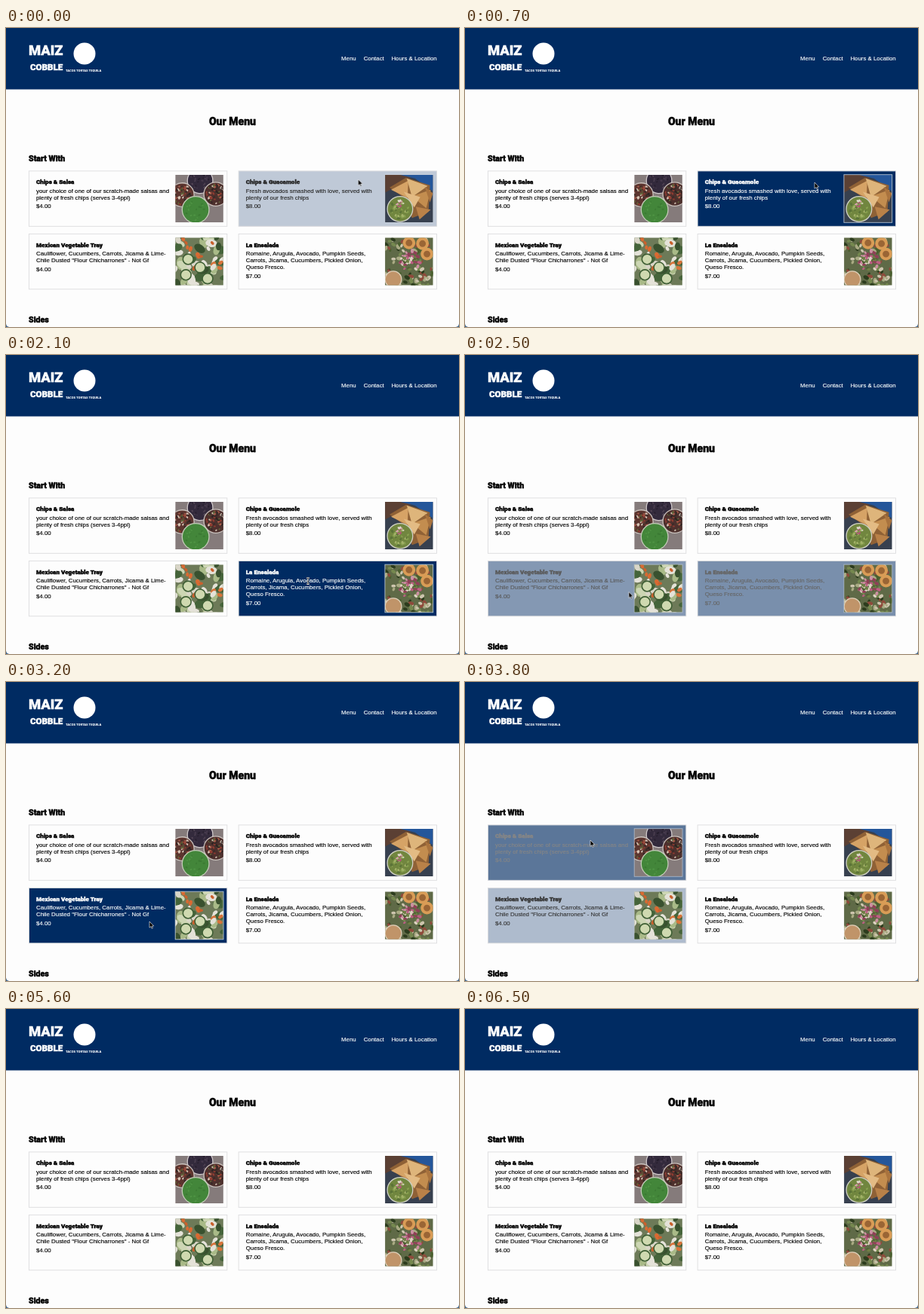
Animation of 600x397 px, one loop 6600 ms. Source, as an HTML page:

```html
<!DOCTYPE html>
<html lang="en">
<head>
<meta charset="utf-8">
<title>Menu</title>
<style>
  @property --h { syntax: "<number>"; inherits: true; initial-value: 0; }
  html, body { margin: 0; height: 100%; overflow: hidden; background: #fdfdfd; }
  #stage { display: block; width: 100vw; height: 100vh; }
  text {
    font: 7.86px "Liberation Sans", Arial, sans-serif;
    white-space: pre;
    fill: var(--ink);
    stroke: var(--ink);
    stroke-width: .14px;
  }
  .bold { font-family: Roboto, Inter, sans-serif; font-weight: 900; stroke-width: .45px; }
  #stage { --ink: #000; }
  #header { --ink: #fff; }

  /* --h runs from 0 (idle) to 1 (hovered) */
  .card {
    --tone: calc(255 * var(--h) * (.5 + .5 * var(--h)));
    --ink: rgb(var(--tone), var(--tone), var(--tone));
    animation: 6.6s ease infinite;
  }
  .panel { fill: rgb(0 43 98 / var(--h)); stroke: #dcdcde; }
  .edge { fill: none; stroke: rgb(255 255 255 / calc(.7 * var(--h))); }
  #salsa { animation-name: salsa; }
  #guacamole { animation-name: guacamole; }
  #tray { animation-name: tray; }
  #salad { animation-name: salad; }
  @keyframes guacamole {
    0% { --h: .24; animation-timing-function: cubic-bezier(.2, .6, .4, 1); }
    6.06%, 17.27% { --h: 1; }
    24.85%, 100% { --h: 0; }
  }
  @keyframes salad {
    0%, 18.94% { --h: 0; }
    26.52%, 35.76% { --h: 1; }
    43.33%, 100% { --h: 0; }
  }
  @keyframes tray {
    0%, 35.76% { --h: 0; }
    43.33%, 54.55% { --h: 1; }
    62.12%, 100% { --h: 0; }
  }
  @keyframes salsa {
    0%, 54.77% { --h: 0; }
    62.35%, 70.38% { --h: 1; }
    77.95%, 100% { --h: 0; }
  }

  #cursor { animation: move 6.6s linear infinite; }
  #arrow { animation: arrow 6.6s step-end infinite; }
  #beam { animation: beam 6.6s step-end infinite; }
  @keyframes move {
    0% { transform: translate(466.5px, 201px); }
    4.55%, 13.64% { transform: translate(463px, 205px); }
    17.27% { transform: translate(448px, 263px); }
    18.94% { transform: translate(435px, 273px); }
    22.73% { transform: translate(407px, 297px); }
    25.76%, 32.58% { transform: translate(400px, 300px); }
    35.76% { transform: translate(300px, 310px); }
    37.88% { transform: translate(217px, 314.5px); }
    40.91%, 50.76% { transform: translate(190px, 318px); }
    54.55% { transform: translate(172px, 268px); }
    57.58%, 67.42% { transform: translate(166px, 210px); }
    70.38% { transform: translate(180px, 189px); }
    72.73% { transform: translate(185.5px, 119px); }
    75.76% { transform: translate(192px, 25px); }
    77.27%, 100% { transform: translate(196px, -22px); }
  }
  @keyframes beam {
    0%, 15.2%, 35.21%, 52.47% { opacity: 0; }
    14.05%, 22.42%, 51.14% { opacity: 1; }
    100% { opacity: 0; }
  }
  @keyframes arrow {
    0%, 15.2%, 35.21%, 52.47% { opacity: 1; }
    14.05%, 22.42%, 51.14% { opacity: 0; }
    100% { opacity: 1; }
  }
</style>
</head>
<body>
<svg id="stage" viewBox="0 0 600 397">
  <rect width="600" height="397" fill="#fdfdfd"/>
  <rect width="600" height="81.5" fill="#002b62"/>

  <g id="header">
    <text class="bold" x="30" y="36" style="font-size:18.4px">MAIZ</text>
    <text class="bold" x="32" y="56" style="font-size:11.6px">COBBLE</text>
    <circle cx="104" cy="34" r="14.5" fill="#fff"/>
    <text class="bold" x="79" y="58" style="font-size:4.1px;stroke-width:0">TACOS TORTAS TEQUILA</text>
    <text x="444" y="43">Menu</text>
    <text x="473.7" y="43">Contact</text>
    <text x="570.7" y="43" text-anchor="end">Hours &amp; Location</text>
  </g>

  <text class="bold" x="300" y="129" text-anchor="middle" style="font-size:14px">Our Menu</text>
  <text class="bold" x="30" y="177" style="font-size:10.6px">Start With</text>
  <text class="bold" x="30" y="391" style="font-size:10.6px">Sides</text>

  <g id="cards"></g>

  <path d="M0 392.5Q.5 396.5 4.5 397H0ZM600 392.5Q599.5 396.5 595.5 397H600Z" fill="#3f658c"/>

  <g id="cursor">
    <path id="arrow" d="M0 0V8.2L1.9 6.5 3.1 9.3 4.4 8.7 3.2 6H5.8Z" fill="#000" stroke="#fff" stroke-width=".6"/>
    <g id="beam" fill="none">
      <g stroke="#fff" stroke-width="1.7"><use href="#bar"/></g>
      <g stroke="#222" stroke-width=".8"><use href="#bar"/></g>
    </g>
  </g>
  <defs>
    <path id="bar" d="M-2-4.2Q0-4.2 0-3V3Q0 4.2-2 4.2M2-4.2Q0-4.2 0-3M0 3Q0 4.2 2 4.2M-1 1H1"/>
  </defs>
</svg>
<script>
  let seed = 11;
  const rnd = () => (seed = seed * 16807 % 2147483647) / 2147483647;
  const disc = (x, y, r, fill, rim = "none", width = 1.3) =>
    `<circle cx="${x}" cy="${y}" r="${r}" fill="${fill}" stroke="${rim}" stroke-width="${width}"/>`;
  const shape = (d, fill) => `<path d="${d}" fill="${fill}"/>`;

  // Loose pieces of food inside a round area
  const bits = (n, x, y, r, size, colours) => Array.from({ length: n }, (_, i) => {
    const a = rnd() * 6.283, d = r * Math.sqrt(rnd()), s = size * (.6 + .6 * rnd());
    const px = x + d * Math.cos(a), py = y + d * Math.sin(a);
    return `<ellipse rx="${s}" ry="${s * .65}" fill="${colours[i % colours.length]}"
      transform="translate(${px} ${py}) rotate(${rnd() * 180})"/>`;
  }).join("");

  const pico = ["#8f3b30", "#d5c3b4", "#2b2322", "#5f6238", "#b3604c", "#3a2a27"];
  const greens = ["#4a5f2e", "#75884f", "#2c3c1d", "#a9aa83"];

  const photos = {
    salsa: () =>
      disc(32, 32, 60, "#857b7b") +
      disc(33, 8, 17, "#332a3c", "#cfc8ca") + bits(26, 33, 7, 13, 1.6, ["#463a4c", "#241d2b", "#544655"]) +
      disc(9, 27, 16, "#5c352f", "#cbc3be") + bits(55, 9, 27, 13, 1.9, pico) +
      disc(54, 26, 16, "#4d302d", "#cbc3be") + bits(55, 54, 26, 13, 1.9, pico) +
      disc(27, 47, 18, "#43863a", "#c4cdb9") + bits(18, 27, 47, 14, 1.6, ["#4f9444", "#3b7a33"]),
    guacamole: () =>
      disc(32, 32, 60, "#37404f") +
      shape("M0 0H40L20 13 0 24Z", "#5b4034") + shape("M20 0H64V22L40 5Z", "#24569a") +
      shape("M6 17 28 4 60 14 58 50 36 58 24 30Z", "#8f6136") +
      shape("M8 20 31 8 30 31Z", "#d6a366") + shape("M29 5 57 15 36 30Z", "#deb57b") +
      shape("M36 29 61 20 55 45Z", "#c38d4f") + shape("M25 23 47 30 39 44Z", "#e3bb84") +
      shape("M41 43 61 47 46 60Z", "#b98148") + shape("M53 16 64 25 60 37Z", "#a9733e") +
      disc(20, 46, 17, "#71863f", "#cfd0c4") + bits(36, 20, 47, 13, 2.2, ["#88a050", "#5b7337", "#a3b169"]) +
      bits(9, 19, 40, 6, 2, ["#b05673", "#d9a0af", "#dedaca"]),
    tray: () =>
      disc(32, 32, 60, "#6d7a58") +
      bits(60, 32, 32, 44, 7.5, ["#cdd6b4", "#45643a", "#e4e2d8", "#a9ba88", "#39512f", "#d9d6c8"]) +
      bits(14, 34, 14, 28, 4.5, ["#d96a32", "#e6e3da", "#c9602d"]) +
      bits(6, 56, 34, 9, 4.5, ["#d8733a", "#e4e2d8"]) +
      [[17, 29], [33, 40], [14, 50], [43, 55]].map(([x, y]) =>
        disc(x, y, 7, "#cfd9b0", "#3f5f35", 1.6)).join(""),
    salad: () =>
      disc(32, 32, 60, "#5f6a47") +
      bits(90, 32, 34, 40, 3.5, [...greens, "#8e4a3b", "#cdc5ae"]) +
      [[32, 7], [50, 8], [56, 22]].map(([x, y]) => disc(x, y, 6.5, "#9a6535", "#d99c56", 4)).join("") +
      bits(40, 33, 31, 14, 2.6, ["#bd5f83", "#ddd3c1", "#8f4058", "#cc90a2", "#6f7f45"]) +
      disc(11, 56, 11, "#c09469", "#ddcfb9")
  };

  const cards = [
    ["salsa", 30, 189.5, "Chips & Salsa", "$4.00",
      "your choice of one of our scratch-made salsas and", "plenty of fresh chips (serves 3-4ppl)"],
    ["guacamole", 307.7, 189.5, "Chips & Guacamole", "$8.00",
      "Fresh avocados smashed with love, served with", "plenty of our fresh chips"],
    ["tray", 30, 273, "Mexican Vegetable Tray", "$4.00",
      "Cauliflower, Cucumbers, Carrots, Jicama & Lime-", "Chile Dusted \"Flour Chicharrones\" - Not Gf"],
    ["salad", 307.7, 273, "La Ensalada", "$7.00",
      "Romaine, Arugula, Avocado, Pumpkin Seeds,", "Carrots, Jicama, Cucumbers, Pickled Onion,", "Queso Fresco."]
  ];
  const line = (y, words, extra = "") =>
    `<text x="10" y="${y}" ${extra}>${words.replace("&", "&amp;")}</text>`;

  document.getElementById("cards").innerHTML = cards.map(([id, x, y, title, price, ...about]) => `
    <g id="${id}" class="card"><g transform="translate(${x} ${y})">
      <rect class="panel" x=".4" y=".4" width="262.4" height="73.4" stroke-width=".9"/>
      ${line(17.5, title, 'class="bold" style="font-size:8.1px"')}
      ${about.map((words, i) => line(29.3 + 9 * i, words)).join("")}
      ${line(31.9 + 9 * about.length, price)}
      <svg x="194.4" y="5.4" width="63.4" height="63.2" viewBox="0 0 64 64" preserveAspectRatio="none">${photos[id]()}</svg>
      <rect class="edge" x="194.2" y="5.2" width="63.8" height="63.6" stroke-width=".9"/>
    </g></g>`).join("");
</script>
</body>
</html>
```
